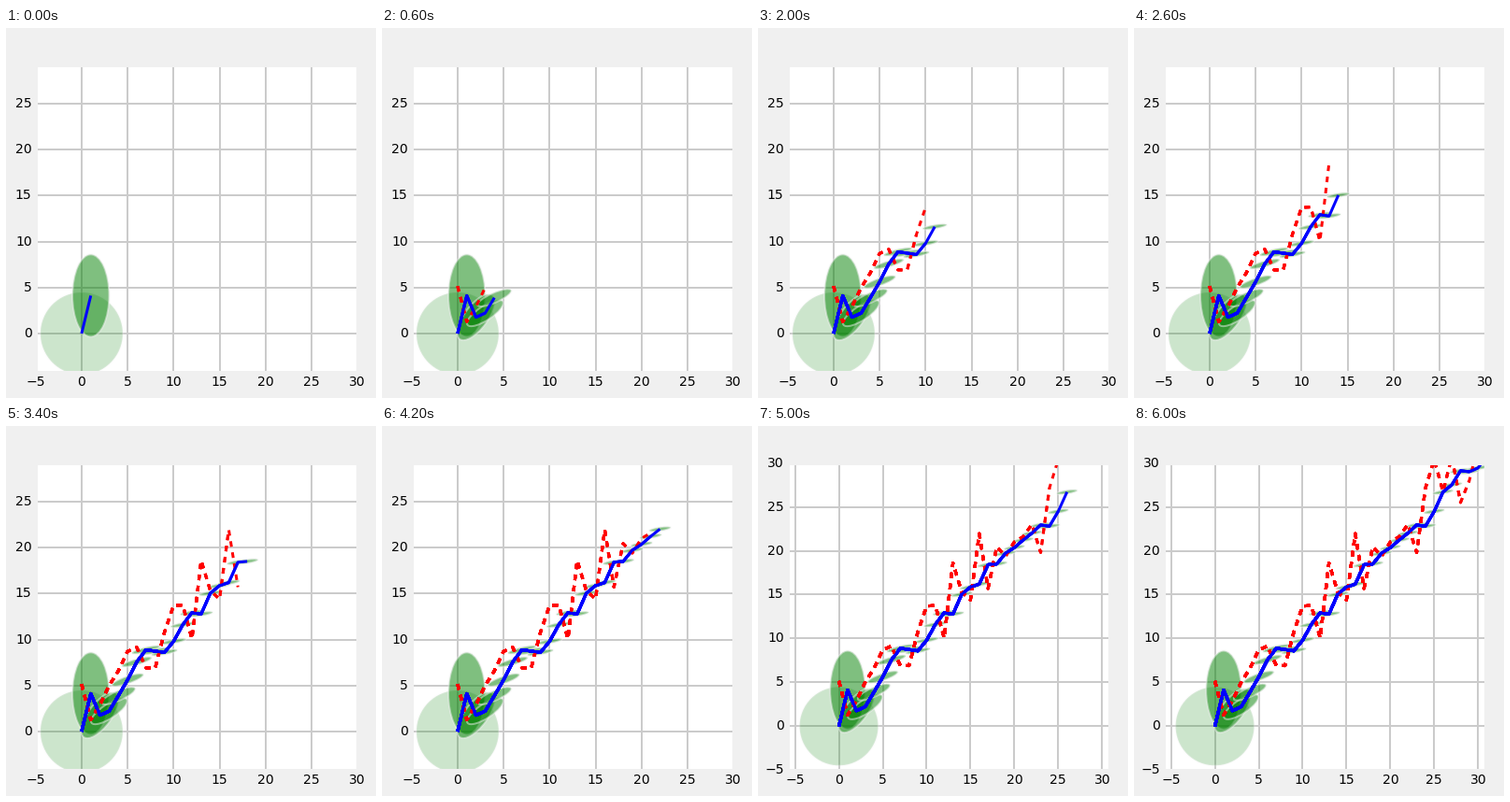
These frames come from a looping animation (396x396 px, 7400 ms). A matplotlib script:

```python
import matplotlib.pyplot as plt
import numpy as np
from matplotlib.animation import FuncAnimation
from matplotlib.patches import Ellipse

plt.rcParams.update({
    "font.family": "DejaVu Sans",
    "font.size": 14,
    "lines.scale_dashes": False,
    "lines.solid_capstyle": "butt",
    "ytick.alignment": "center",
})

BG = "#f0f0f0"
HOLD = 6               # extra ticks on the last step
R, Q, P0 = 5.0, 0.01, 20.0
LOW, HIGH = -5, 30     # fixed range of the driving axis
AX_W, AX_H = 0.87, 0.83

# Noisy sensor readings; the track and its covariances follow from them.
readings = [5.15, 1.28, 2.92, 5.0, 6.6, 8.7, 9.15, 6.92, 6.9, 10.75, 13.7,
            13.75, 10.05, 18.6, 15.3, 14.4, 21.95, 15.7, 20.45, 19.4, 21.0,
            21.6, 23.0, 19.8, 27.15, 30.4, 26.75, 30.7, 25.5, 28.0, 32.0]
STEPS = len(readings)


def kalman(zs):
    """Constant-velocity filter: positions and covariances per reading."""
    F = np.array([[1.0, 1.0], [0.0, 1.0]])
    x, P = np.zeros(2), np.eye(2) * P0
    track, covs = [0.0], []
    for z in zs:
        K = P[:, 0] / (P[0, 0] + R)
        x = x + K * (z - x[0])
        P = P - np.outer(K, P[0])
        track.append(x[0])
        covs.append(P)
        x = F @ x
        P = F @ P @ F.T + np.eye(2) * Q
    return track, covs


def cov_ellipse(center, P, alpha):
    vals, vecs = np.linalg.eigh(P)
    minor, major = 2 * np.sqrt(vals)
    angle = np.degrees(np.arctan2(vecs[1, 1], vecs[0, 1]))
    return ax.add_patch(Ellipse(center, major, minor, angle=angle,
                                facecolor="g", edgecolor=BG, lw=2,
                                alpha=alpha, zorder=1))


fig = plt.figure(figsize=(5.5, 5.5), dpi=72, facecolor=BG)
ax = fig.add_axes([0.08, 0.07, AX_W, AX_H], facecolor="white")
ax.set_axisbelow(True)
ax.grid(True, color="#cbcbcb", lw=2, ls="-")
ax.tick_params(length=0, pad=4)
for spine in ax.spines.values():
    spine.set(color=BG, linewidth=3)

# Each step redraws the whole path so far, which firms up older edges.
track, covs = kalman(readings)
cov_ellipse((0, 0), np.eye(2) * P0, 0.2)
layers = []
for i, P in enumerate(covs):
    e = cov_ellipse((i + 1, track[i + 1]), P, 0.5)
    z, = ax.plot(readings[:i + 1], color="r", lw=3, ls=(0, (6, 6)))
    x, = ax.plot(track[:i + 2], color="b", lw=3)
    layers.append((e, z, x))


def set_view(step):
    """Equal aspect: x drives the scale until the data outgrows the y range."""
    mid, half = (LOW + HIGH) / 2, (HIGH - LOW) / 2
    half_x, half_y = half, half * AX_H / AX_W
    if max(readings[:step + 1]) > mid + half_y:
        half_x, half_y = half * AX_W / AX_H, half
    for axis, h in ((ax.xaxis, half_x), (ax.yaxis, half_y)):
        ticks = np.arange(LOW, HIGH + 1, 5)
        axis.set_ticks(ticks[abs(ticks - mid) <= h])
    ax.set_xlim(mid - half_x, mid + half_x)
    ax.set_ylim(mid - half_y, mid + half_y)


def update(tick):
    step = min(tick, STEPS - 1)
    set_view(step)
    for i, group in enumerate(layers):
        for artist in group:
            artist.set_visible(i <= step)
    return []


anim = FuncAnimation(fig, update, frames=STEPS + HOLD, interval=200,
                     init_func=lambda: update(0), repeat=True,
                     repeat_delay=0, blit=False)
plt.show()
```
